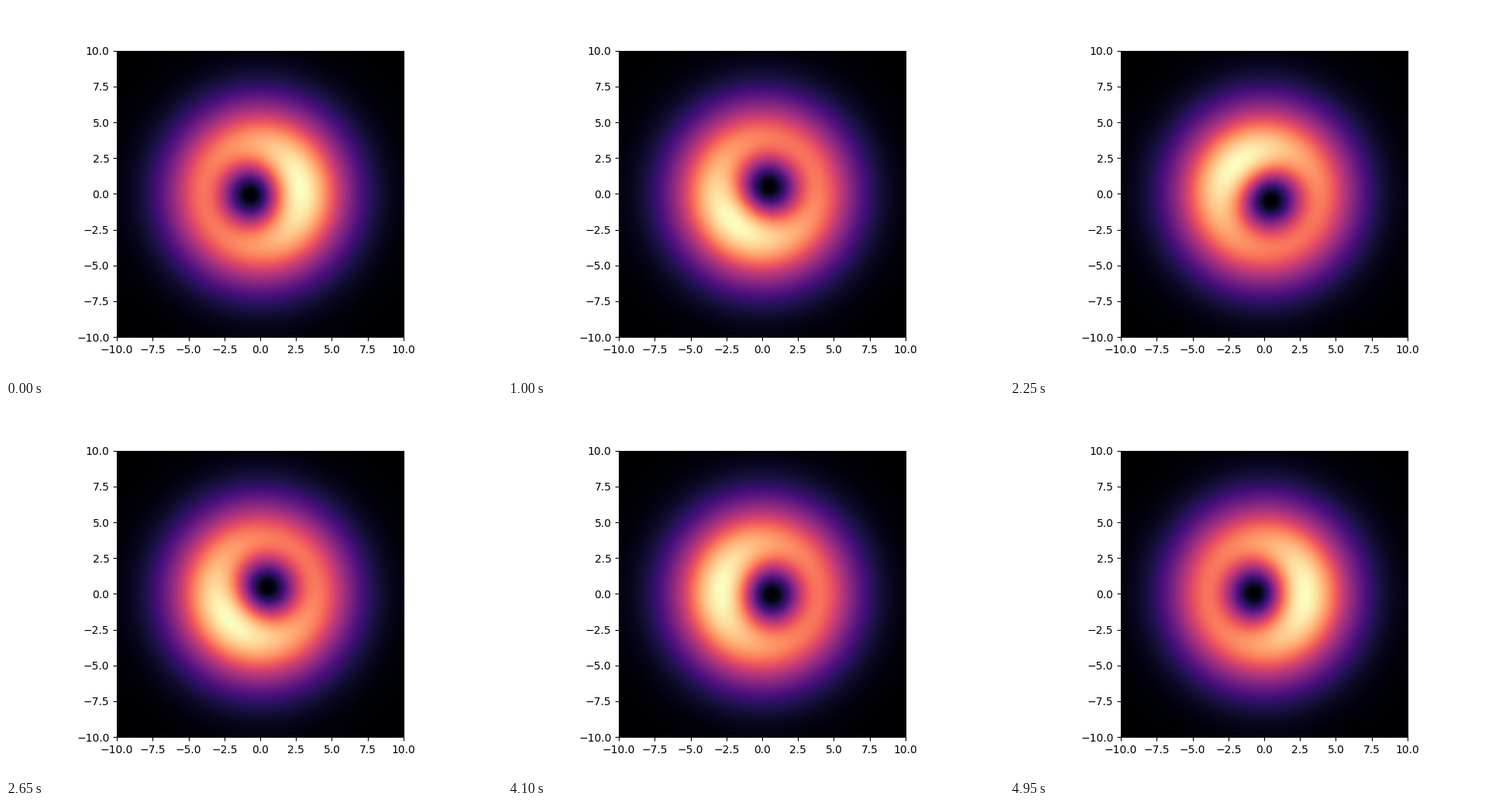
These frames come from a looping animation (640x480 px, 5 s). A matplotlib script:

```python
import numpy as np
import matplotlib.pyplot as plt
from matplotlib.animation import FuncAnimation

FRAMES = 100
INTERVAL = 50
TURNS = 3
START = np.radians(8.5)
SIZE = 10

axis = np.linspace(-SIZE, SIZE, 300)
x, y = np.meshgrid(axis, axis)
r = np.hypot(x, y)


def vortex(r):
    """Radial part of the l=1 state, divided by r."""
    return np.exp(-0.5 * (r / 3.05) ** 1.6)


def core(r):
    """Radial part of the l=0 state."""
    return 0.685 * np.exp(-0.12 * r ** 2)


# |r e^(i phi) vortex + e^(i theta) core|^2, split into still and turning parts
still = (r * vortex(r)) ** 2 + core(r) ** 2
cross = 2 * vortex(r) * core(r)
radii = np.linspace(0, SIZE, 2000)
peak = ((radii * vortex(radii) + core(radii)) ** 2).max()


def density(i):
    theta = START + 2 * np.pi * TURNS * i / FRAMES
    return (still + cross * (x * np.cos(theta) + y * np.sin(theta))) / peak


fig, ax = plt.subplots(figsize=(6.4, 4.8), dpi=100)
image = ax.imshow(density(0), cmap="magma", origin="lower", vmin=0, vmax=1,
                  extent=(-SIZE, SIZE, -SIZE, SIZE))


def update(i):
    image.set_data(density(i))
    return image,


anim = FuncAnimation(fig, update, frames=FRAMES, interval=INTERVAL,
                     repeat=True, repeat_delay=0)
plt.show()
```
